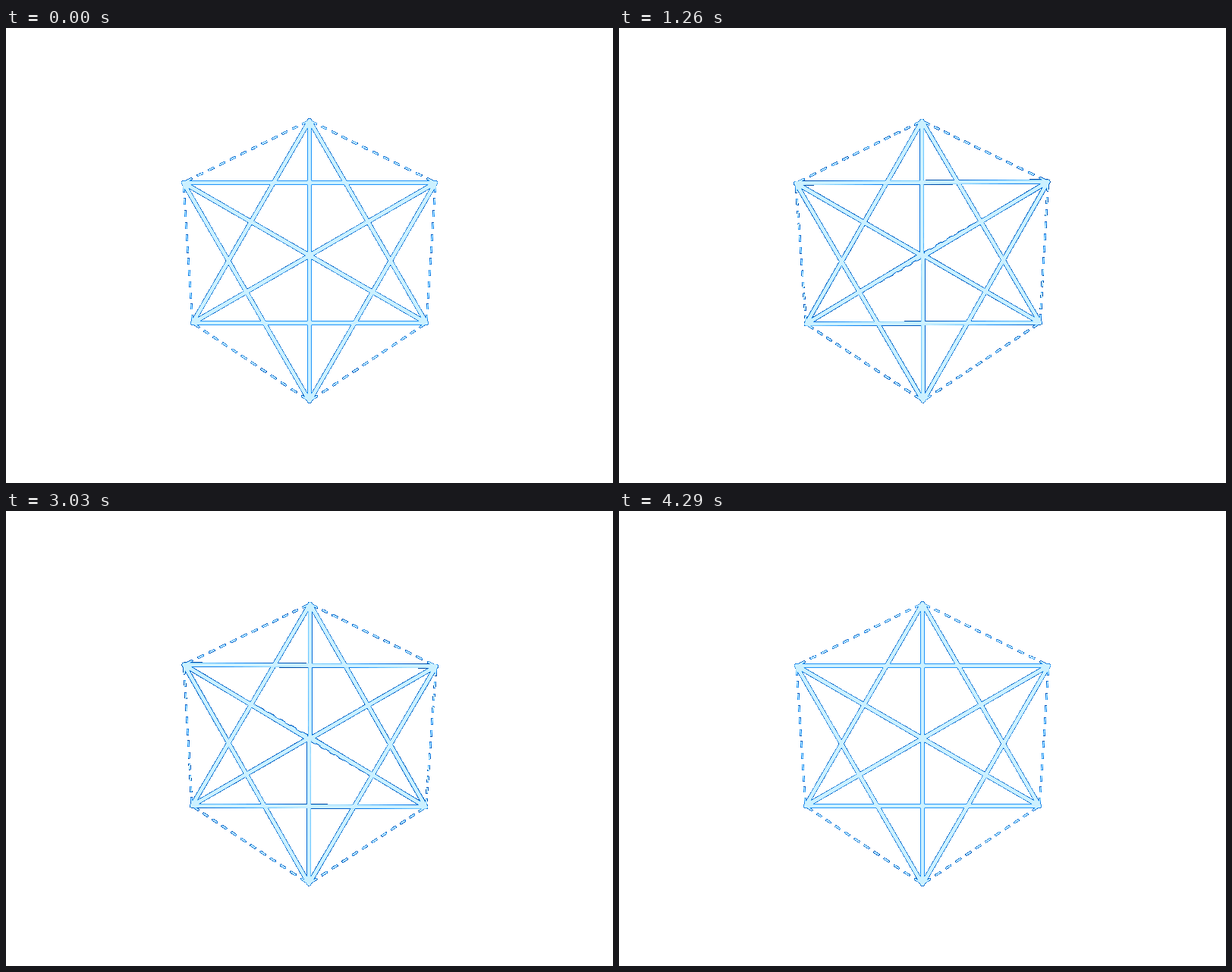
Animation of 800x600 px, one loop 4320 ms. Source, as an HTML page with a canvas:

```html
<!DOCTYPE html>
<html lang="en">
<head>
<meta charset="utf-8">
<title>Turning cube</title>
<style>
html, body { margin: 0; width: 100%; height: 100%; overflow: hidden; background: #fff; }
canvas { display: block; }
</style>
</head>
<body>
<canvas id="stage" width="800" height="600"></canvas>
<script>
const STEP = 30, FRAMES = 144, TURN = 48;
const SAMPLES = 17;                  // exposures per picture, 255 / 17 = 15 levels each
const RADIUS = 195.94, CAMERA = 1725;
const SOLID = 5, DASHED = 2, DASHES = 12;
const LEFT = 190, TOP = 90, SIZE = 420;

const stage = document.getElementById('stage').getContext('2d');
const buffer = document.createElement('canvas');
buffer.width = buffer.height = SIZE;
const ink = buffer.getContext('2d', { willReadFrequently: true });

// Cube axes as seen along a body diagonal (y up, z to the viewer).
const q = Math.SQRT1_2, p = 1 / Math.sqrt(6), m = 1 / Math.sqrt(3);
const AXES = [[-q, -p, m], [0, 2 * p, m], [q, -p, m]];

const corners = [];
for (let i = 0; i < 8; i++) {
  corners.push([0, 1, 2].map(c =>
    AXES.reduce((sum, axis, k) => sum + (i >> k & 1 ? 1 : -1) * axis[c], 0) * RADIUS * m));
}

const edges = [], diagonals = [];
for (let i = 0; i < 8; i++) {
  for (let j = i + 1; j < 8; j++) {
    const bits = [0, 1, 2].filter(k => (i ^ j) >> k & 1).length;
    if (bits === 1) edges.push([i, j]);
    if (bits === 2) diagonals.push([i, j]);
  }
}

// Exposure to colour: unexposed is white, faint is deep blue, full is pale.
const STOPS = [[0, 72, 160], [0, 98, 208], [20, 140, 248], [105, 198, 255], [204, 241, 255]];
const palette = [];
for (let v = 0; v < 256; v++) {
  const x = v / 255 * (STOPS.length - 1);
  const k = Math.min(STOPS.length - 2, Math.floor(x));
  palette.push(v < 4 ? [255, 255, 255]
    : STOPS[k].map((c, n) => c + (STOPS[k + 1][n] - c) * (x - k)));
}

const ease = t => t < 0.5 ? 4 * t ** 3 : 1 - 4 * (1 - t) ** 3;
const mix = (a, b, t) => a.map((c, n) => c + (b[n] - c) * t);

function rotate(v, k, angle) {
  const c = Math.cos(angle), s = Math.sin(angle);
  const dot = (v[0] * k[0] + v[1] * k[1] + v[2] * k[2]) * (1 - c);
  return [
    v[0] * c + (k[1] * v[2] - k[2] * v[1]) * s + k[0] * dot,
    v[1] * c + (k[2] * v[0] - k[0] * v[2]) * s + k[1] * dot,
    v[2] * c + (k[0] * v[1] - k[1] * v[0]) * s + k[2] * dot
  ];
}

function project([x, y, z]) {
  const s = CAMERA / (CAMERA - z);
  return [400 - LEFT + x * s, 300 - TOP - y * s];
}

// Bars and dots all wind the same way, so overlaps merge in one fill.
function bar(a, b, width) {
  const [ax, ay] = project(a), [bx, by] = project(b);
  const half = width / 2 / (Math.hypot(bx - ax, by - ay) || 1);
  const nx = (ay - by) * half, ny = (bx - ax) * half;
  ink.moveTo(ax + nx, ay + ny);
  ink.lineTo(bx + nx, by + ny);
  ink.lineTo(bx - nx, by - ny);
  ink.lineTo(ax - nx, ay - ny);
  ink.closePath();
}

function dot(a, width) {
  const [x, y] = project(a);
  ink.moveTo(x + width / 2, y);
  ink.arc(x, y, width / 2, 0, 2 * Math.PI, true);
  ink.closePath();
}

function expose(time) {
  const turn = Math.floor(time / TURN) % 3;
  const angle = -Math.PI / 2 * ease(time / TURN % 1);
  const pts = corners.map(v => rotate(v, AXES[turn], angle));
  ink.beginPath();
  for (const v of pts) dot(v, SOLID);
  for (const [i, j] of diagonals) bar(pts[i], pts[j], SOLID);
  for (const [i, j] of edges) {
    for (let k = 0; k < DASHES; k++) {
      bar(mix(pts[i], pts[j], (k + 0.25) / DASHES),
          mix(pts[i], pts[j], (k + 0.75) / DASHES), DASHED);
    }
  }
  ink.fill();
}

function draw(frame) {
  ink.globalCompositeOperation = 'source-over';
  ink.globalAlpha = 1;
  ink.fillStyle = '#000';
  ink.fillRect(0, 0, SIZE, SIZE);
  ink.globalCompositeOperation = 'lighter';
  ink.globalAlpha = 1 / SAMPLES;
  ink.fillStyle = '#fff';
  for (let s = 0; s < SAMPLES; s++) expose(frame + (s + 0.5) / SAMPLES);

  const image = ink.getImageData(0, 0, SIZE, SIZE), d = image.data;
  for (let n = 0; n < d.length; n += 4) {
    const c = palette[d[n]];
    d[n] = c[0];
    d[n + 1] = c[1];
    d[n + 2] = c[2];
  }
  stage.putImageData(image, LEFT, TOP);
}

stage.fillStyle = '#fff';
stage.fillRect(0, 0, 800, 600);

const start = performance.now();
let shown = -1;
function tick() {
  const frame = Math.floor((performance.now() - start) / STEP) % FRAMES;
  if (frame !== shown) draw(shown = frame);
  requestAnimationFrame(tick);
}
tick();
</script>
</body>
</html>
```
